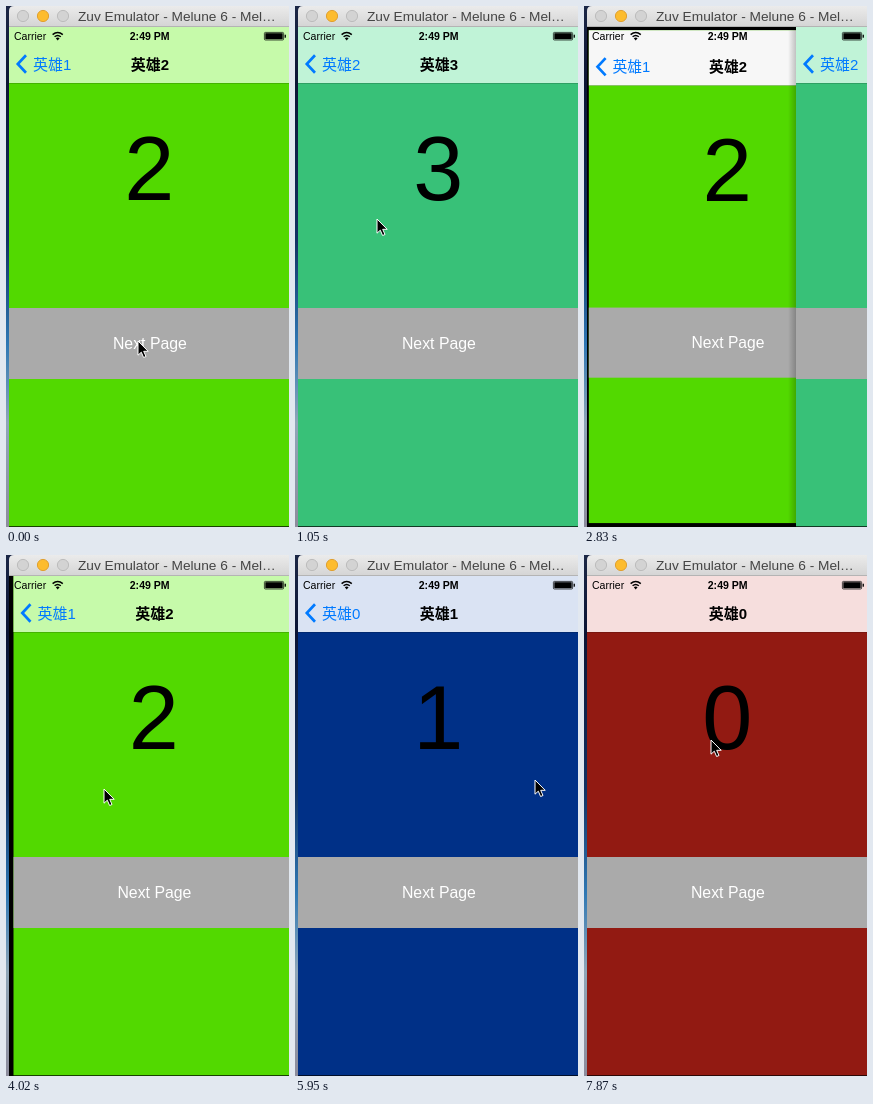
Write an HTML page that moves like this. It is 283 px wide and 521 px high and loops after 8000 ms.

```html
<!DOCTYPE html>
<html lang="zh">
<head>
<meta charset="utf-8">
<title>Swipe back</title>
<style>
html, body { margin: 0; width: 100%; height: 100%; overflow: hidden; background: #000; }
#stage { display: block; width: 283px; height: 521px; font-family: "Liberation Sans", "Noto Sans CJK SC", "Noto Sans CJK JP", "Noto Sans CJK", sans-serif; }
.mid { text-anchor: middle; }
.digit { font-size: 90px; }
.next { font-size: 15.84px; fill: #fff; }
.title { font-size: 15px; font-weight: 700; }
.back { font-size: 15px; fill: #007aff; }
.back path { fill: none; stroke: #007aff; stroke-width: 2.7; }
.status { font-size: 10.56px; }
.window { font-size: 13.7px; fill: #444; }
</style>
</head>
<body>
<svg id="stage" viewBox="0 0 283 521">
  <defs>
    <linearGradient id="desk" x2="0" y2="1">
      <stop offset="0" stop-color="#1b2746"/>
      <stop offset=".15" stop-color="#0b1434"/>
      <stop offset=".45" stop-color="#123263"/>
      <stop offset=".65" stop-color="#2f78b4"/>
      <stop offset=".8" stop-color="#8fa6b8"/>
      <stop offset="1" stop-color="#8d8c9c"/>
    </linearGradient>
    <linearGradient id="chrome" x2="0" y2="1">
      <stop offset="0" stop-color="#ebebeb"/>
      <stop offset="1" stop-color="#d4d4d4"/>
    </linearGradient>
    <linearGradient id="shade">
      <stop offset="0" stop-opacity="0"/>
      <stop offset="1" stop-opacity=".22"/>
    </linearGradient>
  </defs>

  <rect width="283" height="521" fill="url(#desk)"/>
  <path d="M3 21V5q0-5 5-5H283V21Z" fill="url(#chrome)"/>
  <rect x="3" y="20" width="280" height="1" fill="#b4b4b4"/>
  <g stroke-width="1">
    <circle cx="17" cy="10" r="5.6" fill="#d3d3d3" stroke="#bcbcbc"/>
    <circle cx="37" cy="10" r="5.6" fill="#fdbc2e" stroke="#e0a030"/>
    <circle cx="57" cy="10" r="5.6" fill="#d3d3d3" stroke="#bcbcbc"/>
  </g>
  <text class="window" x="72" y="15">Zuv Emulator - Melune 6 - Mel…</text>

  <svg x="3" y="21" width="280" height="500" overflow="hidden">
    <rect width="282" height="500"/>
    <g id="pages"></g>
  </svg>

  <g class="status">
    <text x="8" y="34">Carrier</text>
    <text class="mid" x="143.7" y="34" font-weight="700">2:49 PM</text>
    <g fill="none" stroke="#000" stroke-width="1.5">
      <path d="M46.6 28.6Q51.7 24.4 56.8 28.6M48.6 30.8Q51.7 28.2 54.8 30.8"/>
    </g>
    <path d="M49.8 32.2Q51.7 30.8 53.6 32.2L51.7 34.4Z"/>
    <rect x="258.4" y="26.4" width="19.2" height="7.6" rx="1" fill="none" stroke="#000" stroke-width=".7"/>
    <rect x="259.3" y="27.2" width="17.4" height="6"/>
    <rect x="278.6" y="28.7" width="1.3" height="3"/>
  </g>
  <path id="cursor" d="M0 0V14.2L3.3 11.2L5.6 16.5L8 15.5L5.7 10.3H10.2Z" stroke="#fff" stroke-width="1"/>
</svg>

<script>
const W = 281.6, H = 499.3, LOOP = 8000;
const SNAPSHOT_BAR = '#f7f7f7', PALE_GREEN = '#def8d2';
const THEMES = [
  ['#921a12', '#f6dedd'],
  ['#003087', '#dae3f3'],
  ['#52d900', '#c6faaa'],
  ['#38c178', '#c0f3d7']
];

// The screen refreshes every 150 ms inside these spans, and holds between them.
const SPANS = [[0, 0], [150, 150], [450, 1050], [1350, 2390], [2530, 3570], [3720, 3720],
  [4020, 4910], [5510, 6100], [6540, 6690], [6830, 7580], [7870, 7870]];

// Each swipe: the page on top, then [time, offset] points.
const SWIPES = [
  { top: 3, path: [[1350, 3], [1650, 20], [2390, 94], [2530, 125], [2830, 209], [3130, 268], [3280, W]] },
  { top: 2, path: [[4020, 4.5], [4320, 45], [4620, 115], [4910, 179], [5510, 205], [5660, 250], [5810, W]] },
  { top: 1, path: [[6540, 10], [6690, 72], [6830, 149], [7130, 268], [7280, W]] }
];

const POINTER = [[0, 132, 335], [750, 132, 335], [1050, 82, 213], [1350, 87, 214], [2390, 180, 222],
  [2530, 211, 224], [2830, 300, 228], [3130, 300, 232], [3430, 120, 230], [3570, 72, 229],
  [3720, 78, 232], [4020, 98, 234], [4320, 131, 236], [4620, 201, 238], [4910, 265, 238],
  [5510, 272, 238], [5810, 240, 225], [6100, 84, 195], [6540, 100, 194], [6690, 165, 194],
  [6830, 300, 194], [7130, 300, 190], [7430, 130, 186], [7580, 77, 181], [7870, 127, 185]];

const pageMarkup = ([color, bar], n) => `
  <g class="page">
    <rect x="-8" width="8" height="${H}" fill="url(#shade)"/>
    <g class="body">
      <rect width="${W}" height="${H}" fill="${color}"/>
      <text class="digit mid" x="140.3" y="172.7">${n}</text>
      <rect y="281" width="${W}" height="71" fill="#aaa"/>
      <text class="next mid" x="140.9" y="322.3">Next Page</text>
    </g>
    <g class="bar">
      <rect class="tint" width="${W}" height="56" fill="${bar}"/>
      <rect y="56" width="${W}" height=".5" fill-opacity=".35"/>
      ${n ? `<g class="back"><path d="M17 28.3L8.8 37L17 45.7"/><text x="24" y="42.5">英雄${n - 1}</text></g>` : ''}
      <text class="title mid" x="141" y="42.5">英雄${n}</text>
    </g>
  </g>`;

const root = document.getElementById('pages');
const cursor = document.getElementById('cursor');
root.innerHTML = THEMES.map(pageMarkup).join('');
const pages = [...root.children].map(el => {
  const part = name => el.querySelector('.' + name);
  return { el, body: part('body'), bar: part('bar'), tint: part('tint'), back: part('back'), title: part('title') };
});

const shift = (el, x, y = 0) => el.setAttribute('transform', `translate(${x} ${y})`);
const clamp = v => Math.min(1, Math.max(0, v));

function sample(path, t) {
  const i = path.findIndex(p => p[0] > t);
  if (i < 0) return path[path.length - 1].slice(1);
  if (i === 0) return path[0].slice(1);
  const a = path[i - 1], b = path[i], k = (t - a[0]) / (b[0] - a[0]);
  return a.slice(1).map((v, j) => v + (b[j + 1] - v) * k);
}

function refreshTime(t) {
  const [start, end] = SPANS.filter(s => s[0] <= t).pop();
  return t >= end ? end : start + Math.floor((t - start) / 150) * 150;
}

function reset() {
  pages.forEach((p, n) => {
    p.el.style.display = 'none';
    p.bar.style.opacity = p.title.style.opacity = 1;
    p.tint.setAttribute('fill', THEMES[n][1]);
    [p.el, p.body, p.title].forEach(el => shift(el, 0));
    if (p.back) {
      shift(p.back, 0);
      p.back.style.opacity = 1;
    }
  });
}

const show = n => {
  pages[n].el.style.display = '';
  return pages[n];
};

function push(from, to, t) {
  const p = 1 - (1 - clamp((t - 400) / 560)) ** 3;
  const a = show(from), b = show(to);
  shift(a.body, -W * .3 * p);
  shift(a.title, -98 * p);
  a.title.style.opacity = a.back.style.opacity = 1 - p;
  shift(b.body, W * (1 - p));
  shift(b.title, 110 * (1 - p));
  shift(b.back, 98 * (1 - p));
  b.bar.style.opacity = p;
}

function swipe(top, x) {
  const under = show(top - 1), s = .95 + .05 * x / W;
  under.tint.setAttribute('fill', SNAPSHOT_BAR);
  under.el.setAttribute('transform', `translate(${W / 2 * (1 - s)} ${H / 2 * (1 - s)}) scale(${s})`);
  shift(show(top).el, x);
}

function draw(t) {
  reset();
  if ((t >= 150 && t < 1050) || t >= 4170) pages[2].tint.setAttribute('fill', PALE_GREEN);
  const active = SWIPES.filter(s => s.path[0][0] <= t).pop();
  if (t < 450) show(2);
  else if (t < 1050) push(2, 3, t);
  else if (!active) show(3);
  else {
    const [x] = sample(active.path, t);
    if (x < W) swipe(active.top, x);
    else show(active.top - 1);
  }
  shift(cursor, ...sample(POINTER, t));
}

const begin = performance.now();
function tick(now) {
  draw(refreshTime(Math.max(0, now - begin) % LOOP));
  requestAnimationFrame(tick);
}
draw(0);
requestAnimationFrame(tick);
</script>
</body>
</html>
```
